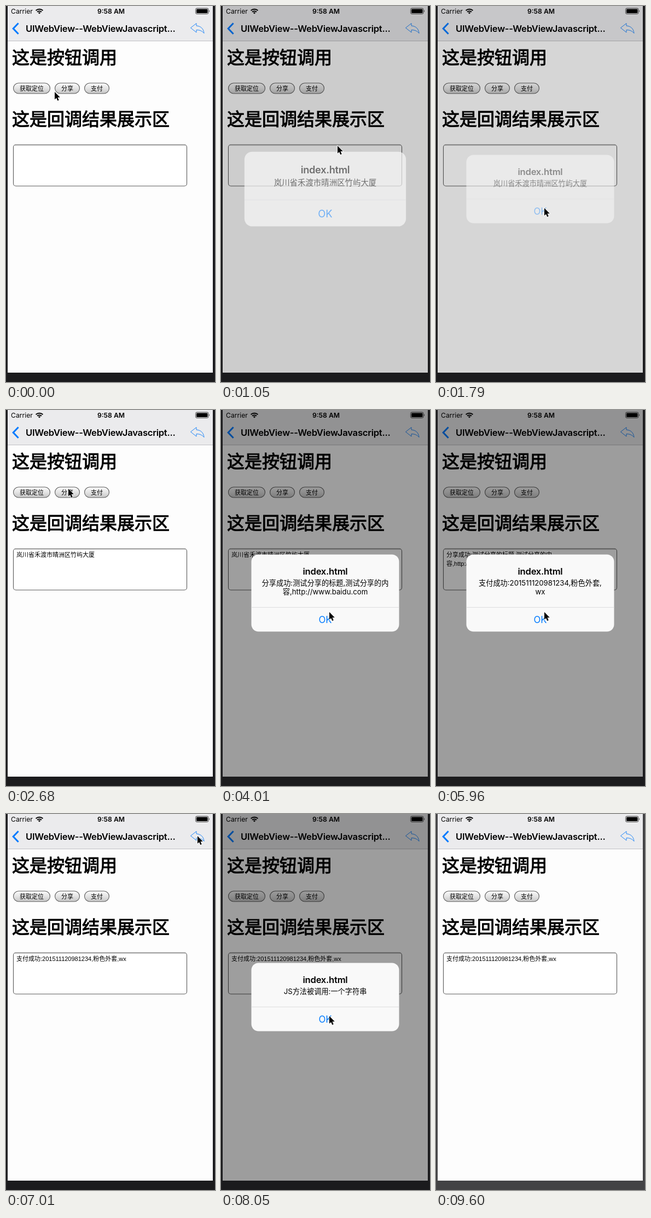
Animation, 382 px wide and 683 px high, one loop 9700 ms. Source, as an HTML page:

```html
<!DOCTYPE html>
<html lang="zh-CN">
<head>
<meta charset="utf-8">
<title>WebView bridge demo</title>
<style>
  html, body { margin: 0; width: 100%; height: 100%; overflow: hidden; background: #1b1b1d; }
  svg { display: block; width: 100%; height: 100%; }
  text { font-family: Inter, 'Noto Sans CJK SC', 'Noto Sans CJK', sans-serif; }
  .h1 { font-size: 32px; stroke: #000; stroke-width: 1; }
  .btn { font-size: 11px; text-anchor: middle; }
  .area { font: 11px 'Liberation Sans', 'Noto Sans CJK SC', 'Noto Sans CJK', sans-serif; }
  .title { font-size: 16.6px; font-weight: 600; letter-spacing: -.24px; }
  .mid { text-anchor: middle; }
</style>
</head>
<body>
<svg viewBox="0 0 382 683">
  <defs>
    <linearGradient id="pill" x2="0" y2="1">
      <stop offset="0" stop-color="#fafafa"/>
      <stop offset=".5" stop-color="#e4e4e4"/>
      <stop offset="1" stop-color="#c6c6c6"/>
    </linearGradient>
  </defs>
  <rect id="bezel" width="382" height="683"/>
  <rect x="3" width="375" height="666" fill="#fdfdfd"/>

  <rect x="3" width="375" height="63" fill="#ebebed"/>
  <rect x="3" y="63" width="375" height="1" fill="#c0c0c3"/>
  <text x="9" y="14" font-size="12.2">Carrier</text>
  <path d="M54.6 8.3a9.2 9.2 0 0 1 12.8 0M57 10.9a5.8 5.8 0 0 1 8 0" fill="none" stroke="#000" stroke-width="2"/>
  <path d="M61 14.6l-2.2-2.3a3.2 3.2 0 0 1 4.4 0z"/>
  <text class="mid" x="192" y="14" font-size="12.2" font-weight="600">9:58 AM</text>
  <rect x="346.5" y="4" width="23.5" height="10.5" rx="2.5" fill="none" stroke="#333" stroke-width=".9"/>
  <rect x="348" y="5.5" width="20.5" height="7.5" rx="1.2"/>
  <path d="M371.3 7.3q1.6 1.9 0 4z"/>

  <path d="M22.6 31.3L13.2 41l9.4 9.7" fill="none" stroke="#007aff" stroke-width="3"/>
  <text class="title" x="36" y="47">UIWebView--WebViewJavascript...</text>
  <path d="M337.5 39.7L348 31.5V36C356 36.5 361 41 362 49.5C358 45 354 43.5 348 43.5V48Z"
        fill="none" stroke="#2086f8" stroke-linejoin="round"/>

  <text class="h1" x="11" y="105">这是按钮调用</text>
  <g id="buttons"></g>
  <text class="h1" x="11" y="217">这是回调结果展示区</text>
  <rect x="13.5" y="252" width="317" height="75" rx="4.5" fill="#fff" stroke="#5a5a5a" stroke-width="1.1"/>
  <path d="M16 253.2H328" stroke="#000" stroke-opacity=".22"/>
  <g id="result"></g>

  <rect id="dim" x="3" width="375" height="666"/>
  <g id="alert"></g>
  <path id="cursor" d="M0 0V13.8L3.1 10.9L5.3 16L7.7 15L5.5 10H9.8Z"
        stroke="#fff" stroke-width="1.5" paint-order="stroke"/>
</svg>
<script>
const $ = id => document.getElementById(id);
const LOOP = 9700, STEP = 148.8, FLASH = 9600;

const place = ['岚川省禾渡市晴洲区竹屿大厦'];
const share = ['分享成功:测试分享的标题,测试分享的内', '容,http:\/\/www.baidu.com'];
const paid = '支付成功:201511120981234,粉色外套,wx';

// Each alert: step it shows, step OK is pressed, message, text left in the box
const alerts = [
  { show: 7, press: 11, msg: place, result: place },
  { show: 23, press: 27, msg: share, result: share },
  { show: 37, press: 42, msg: [paid.slice(0, -2), paid.slice(-2)], result: [paid] },
  { show: 50, press: 56, msg: ['JS方法被调用:一个字符串'], result: [paid] }
];

// Each move: first step, number of steps, where the cursor ends
const start = [88, 155], ok = [197, 366];
const moves = [
  [0, 2, [48, 147]],
  [5, 2, [212, 253]], [7, 3, ok],
  [13, 5, [113, 142]],
  [21, 4, ok],
  [27, 5, [160, 150]],
  [35, 1, [171, 165]], [36, 3, ok],
  [43, 4, [349, 39]],
  [48, 6, ok],
  [57, 4, [220, 700]]
];

const clamp = v => Math.min(1, Math.max(0, v));
const ease = v => v * v * (3 - 2 * v);

const lines = (list, attrs, x, y, gap) =>
  list.map((s, i) => `<text ${attrs} x="${x}" y="${y + i * gap}">${s}</text>`).join('');

let left = 13;
for (const label of ['获取定位', '分享', '支付']) {
  const w = 24 + 11 * label.length;
  $('buttons').innerHTML +=
    `<rect x="${left + .5}" y="140" width="${w - 1}" height="19" rx="9.5" fill="url(#pill)" stroke="#5c5c5c" stroke-width="1.1"/>
     <text class="btn" x="${left + w / 2}" y="153.7">${label}</text>`;
  left += w + 8;
}

function cursorAt(step) {
  return moves.reduce((from, [first, n, to]) => {
    const k = ease(clamp((step - first) / n));
    return from.map((v, i) => v + (to[i] - v) * k);
  }, start);
}

function drawAlert(step) {
  const item = alerts.find(a => step >= a.show && step < a.press + 2);
  $('alert').innerHTML = '';
  $('dim').setAttribute('opacity', 0);
  if (!item) return;

  const { show, press, msg } = item;
  const leaving = step > press;
  const p = leaving ? .4 : 1 - .48 * .1 ** (step - show);
  const scale = leaving ? 1 : 1 + .195 * (1 - p);
  const h = 108 + 16 * msg.length, y = 332.5 - h / 2, row = y + h - 44;
  const panel = 1 - (1 - p) ** 1.6;
  const pressed = step === press
    ? `<path d="M55.5 ${row}h270v31a13 13 0 0 1 -13 13h-244a13 13 0 0 1 -13 -13z" fill="#e4e4e4"/>` : '';
  $('dim').setAttribute('opacity', .38 * p);
  $('alert').setAttribute('transform',
    `translate(190.5 332.5) scale(${scale}) translate(-190.5 -332.5)`);
  $('alert').innerHTML =
    `<rect x="55.5" y="${y}" width="270" height="${h}" rx="13" fill="#f9f9f9" opacity="${panel}"/>
     <g opacity="${p}">${pressed}
       <text class="title mid" x="190.5" y="${y + 36.3}">index.html</text>
       ${lines(msg, 'class="mid" font-size="13.2"', 190.5, y + 56.3, 16)}
       <path d="M55.5 ${row}h270" stroke="#d6d6d8" stroke-width=".8"/>
       <text class="mid" x="190.5" y="${y + h - 15.3}" font-size="16.8" fill="#007aff">OK</text>
     </g>`;
}

function draw(t) {
  const step = Math.floor((t + 6) / STEP);
  const [x, y] = cursorAt(step);
  const done = alerts.filter(a => step >= a.press + 3).pop();
  $('bezel').setAttribute('fill', t >= FLASH ? '#434345' : '#1b1b1d');
  $('result').innerHTML = lines(done ? done.result : [], 'class="area"', 19, 266.8, 16);
  $('cursor').setAttribute('transform', `translate(${x + 1} ${y + 1})`);
  drawAlert(step);
}

function tick() {
  draw(performance.now() % LOOP);
  requestAnimationFrame(tick);
}
tick();
</script>
</body>
</html>
```
